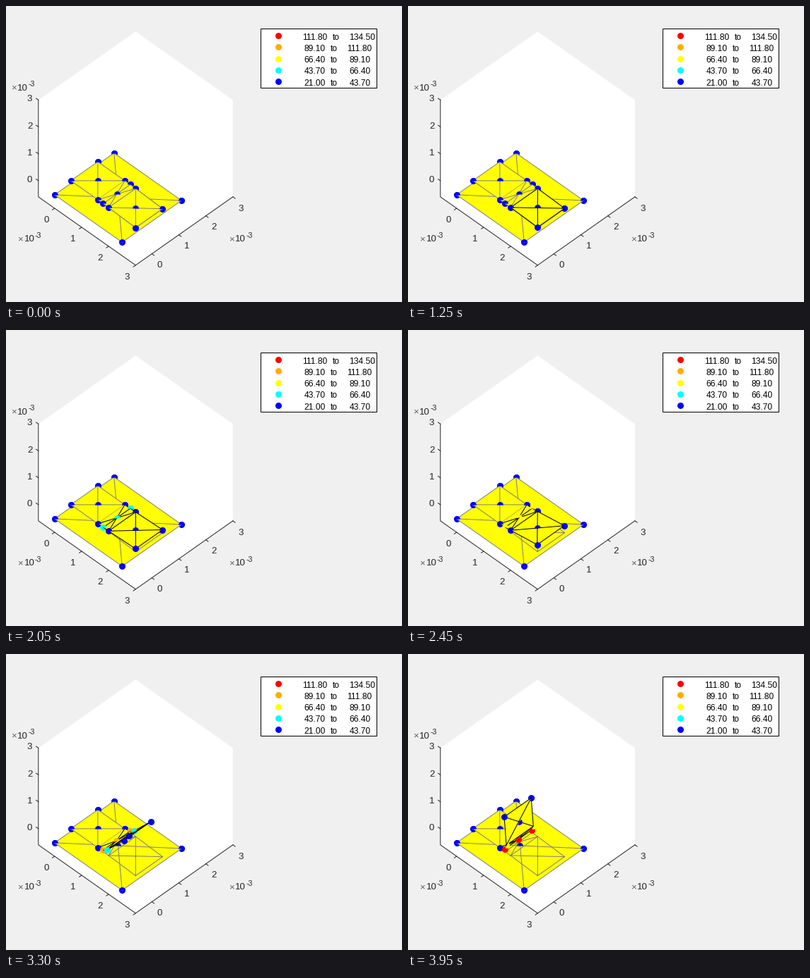
A matplotlib script for the animation above (4000 ms loop, 560 by 420 pixels).

```python
import numpy as np
import matplotlib.pyplot as plt
from matplotlib.animation import FuncAnimation
from matplotlib.path import Path

W, H, DPI = 560, 420, 100
FRAMES, INTERVAL = 80, 50
PX = 72 / DPI  # points per pixel
INK, GREY = "#262626", "#808080"
LEVELS = ["#0000ff", "#00ffff", "#ffff00", "#ffaf00", "#ff0000"]
BLUE, YELLOW = LEVELS[0], LEVELS[2]
LO, HI = -0.6, 3.0
HINGE, PANEL = 0.4, 1.0  # lengths of the bending strip and the flap

plt.rcParams["font.family"] = "Liberation Sans"
fig = plt.figure(figsize=(W / DPI, H / DPI), dpi=DPI, facecolor="#f0f0f0")
ax = fig.add_axes([0, 0, 1, 1])
ax.set(xlim=(0, W), ylim=(H, 0))
ax.axis("off")


def project(p):
    x, y, z = p
    return 45.8 + 38.2 * (x + y + 1.2), 247.9 + 26.94 * (x - y) - 38.2 * z


def bend(s, y, theta):
    """Point at arc length s past the fold line; the hinge is a circular arc."""
    a = min(s, HINGE)
    half = theta * a / HINGE / 2
    chord = a * np.sinc(half / np.pi)
    rest = s - a
    return (1 + chord * np.cos(half) + rest * np.cos(theta), y,
            chord * np.sin(half) + rest * np.sin(theta))


def strokes(segments):
    xs, ys = [], []
    for seg in segments:
        for p in seg:
            px, py = project(p)
            xs.append(px)
            ys.append(py)
        xs.append(np.nan)
        ys.append(np.nan)
    return xs, ys


def fan(ring, centre):
    return [list(ring) + [ring[0]]] + [(p, centre) for p in ring]


def lines(segments, color, z):
    return ax.plot(*strokes(segments), color=color, lw=PX, zorder=z,
                   solid_joinstyle="round")[0]


def face(points, color, z):
    return ax.fill(*zip(*map(project, points)), color=color, lw=0, zorder=z)[0]


def half_disc(theta):
    """Part of a marker lying in front of the tilted surface it sits on."""
    c, s = np.cos(theta), np.sin(theta)
    along = np.array([38.2, 26.94])
    up = np.array([38.2 * c, -26.94 * c + 38.2 * s])
    d = along * (0.5 * c + 0.705 * s) + up * 0.5
    start = np.degrees(np.arctan2(d[1], d[0]))
    if up[0] * along[1] - up[1] * along[0] < 0:
        start -= 180
    return Path.wedge(start, start + 180)


class Nodes:
    """Balls cut by their surface: full discs below it, half discs above."""

    def __init__(self, points, below, above):
        xs, ys = zip(*map(project, points))
        style = dict(ls="", ms=9 * PX, mew=0, color=BLUE)
        self.disc = ax.plot(xs, ys, marker="o", zorder=below, **style)[0]
        self.front = ax.plot(xs, ys, marker=half_disc(0), zorder=above, **style)[0]

    def update(self, points, theta, color=BLUE):
        for part in (self.disc, self.front):
            part.set_data(*zip(*map(project, points)))
            part.set_color(color)
        self.front.set_marker(half_disc(theta))


def text(x, y, s, size=13.3, ha="center", color=INK):
    ax.text(x, y, s, fontsize=size * PX, ha=ha, va="center_baseline",
            color=color, zorder=20)


def strip(theta):
    """Ring and centre points of hinge and flap."""
    end = HINGE + PANEL
    hinge = [bend(s, y, theta) for s, y in
             [(0, 0), (0.2, 0), (HINGE, 0), (HINGE, 1), (0.2, 1), (0, 1)]]
    panel = [bend(s, y, theta) for s, y in
             [(HINGE, 0), (end, 0), (end, 1), (HINGE, 1)]]
    return (hinge, bend(0.2, 0.5, theta),
            panel, bend(HINGE + PANEL / 2, 0.5, theta))


def hinge_lines(ring, mid):
    return [ring[:3], ring[3:]] + [(p, mid) for p in ring]


def draw_box():
    walls = [(LO, LO, LO), (HI, LO, LO), (HI, HI, LO),
             (HI, HI, HI), (LO, HI, HI), (LO, LO, HI)]
    face(walls, "white", 1)
    lines([[walls[5], walls[0], walls[1], walls[2]]], INK, 2)
    tick = 0.085
    for v in range(4):
        for p, q, dx, dy, ha in [
            ((v, LO, LO), (v, LO - tick, LO), -12, 15.2, "center"),
            ((HI, v, LO), (HI + tick, v, LO), 11, 15.2, "center"),
            ((LO, LO, v), (LO - tick, LO, v), -8.5, -2.5, "right"),
        ]:
            lines([(p, q)], INK, 2)
            x, y = project(p)
            text(x + dx, y + dy, str(v), ha=ha)
    for x, y in [(7, 115), (16.5, 330), (315, 330)]:
        text(x, y, "×", ha="left", color="#606060")
        text(x + 9.3, y, "10", ha="left")
        text(x + 24.5, y - 5, "-3", 10.6, "left")


def draw_legend():
    ax.fill([360.2, 524.2, 524.2, 360.2], [31.7, 31.7, 115.7, 115.7],
            fc="white", ec="black", lw=PX, zorder=18)
    bounds = [134.5, 111.8, 89.1, 66.4, 43.7, 21.0]
    for i, color in enumerate(LEVELS[::-1]):
        y = 42 + 16.3 * i
        ax.plot(384.7, y, "o", ms=9 * PX, mew=0, color=color, zorder=19)
        cols = (419.5, 462, 485.5) if i == 0 else (421.7, 459, 482.5 if i == 1 else 485.5)
        words = (f"{bounds[i + 1]:.2f}", "to", f"{bounds[i]:.2f}")
        for x, word in zip(cols, words):
            text(x, y + 1, word, 12, "left", "black")


draw_box()
draw_legend()

# Ground plate
plate = [(0, -0.6, -0.1), (2.5, -0.6, -0.1), (2.5, 1.6, -0.1), (0, 1.6, -0.1)]
core = (1.25, 0.5, -0.1)
face(plate, YELLOW, 3)
lines(fan(plate, core), GREY, 4)
Nodes(plate + [core], 2.5, 5)

# Fixed panel
fixed = [(0, 0, 0), (1, 0, 0), (1, 1, 0), (0, 1, 0)]
hub = (0.5, 0.5, 0)
face(fixed, YELLOW, 7)
lines(fan(fixed, hub), GREY, 8)
Nodes(fixed + [hub], 6.5, 9)

# Rest shape and moving parts
REST = -0.045
ring, mid, flap, centre = strip(REST)
lines(hinge_lines(ring, mid) + fan(flap, centre), GREY, 6)
hinge_a = face(ring, YELLOW, 8.4)
hinge_b = face(ring, YELLOW, 8.4)
hinge_net = lines(hinge_lines(ring, mid), GREY, 8.5)
flap_face = face(flap, YELLOW, 10)
flap_net = lines(fan(flap, centre), GREY, 11)
mid_nodes = Nodes([ring[1], mid, ring[4]], 8.2, 9)
base_nodes = Nodes([flap[0], flap[3]], 8.2, 12)
tip_nodes = Nodes([flap[1], flap[2], centre], 9.5, 12)

KEY_T = [0, 12, 22, 33, 44, 49, 55, 57, 66, 77, 79]
KEY_A = [REST, -0.044, -0.037, -0.02, 0.07, 0.165, 0.272, 0.34, 0.9, 1.54, 1.65]


def level(heat):
    return LEVELS[min(4, int(heat * 5))]


def update(i):
    theta = np.interp(i, KEY_T, KEY_A)
    heat = (i / (FRAMES - 1)) ** 1.7
    ring, mid, flap, centre = strip(theta)

    hinge_a.set_xy([project(ring[k]) for k in (0, 1, 4, 5)])
    hinge_b.set_xy([project(ring[k]) for k in (1, 2, 3, 4)])
    flap_face.set_xy([project(p) for p in flap])
    hinge_net.set_data(*strokes(hinge_lines(ring, mid)))
    flap_net.set_data(*strokes(fan(flap, centre)))
    hinge_net.set_color("black" if theta > 0 else GREY)
    flap_net.set_color("black" if theta > -0.037 else GREY)

    mid_nodes.update([ring[1], mid, ring[4]], theta / 2, level(heat))
    base_nodes.update([flap[0], flap[3]], theta, level(0.43 * heat))
    tip_nodes.update([flap[1], flap[2], centre], theta)
    return []


anim = FuncAnimation(fig, update, frames=FRAMES, interval=INTERVAL,
                     repeat=True, repeat_delay=0, blit=False)
plt.show()
```
